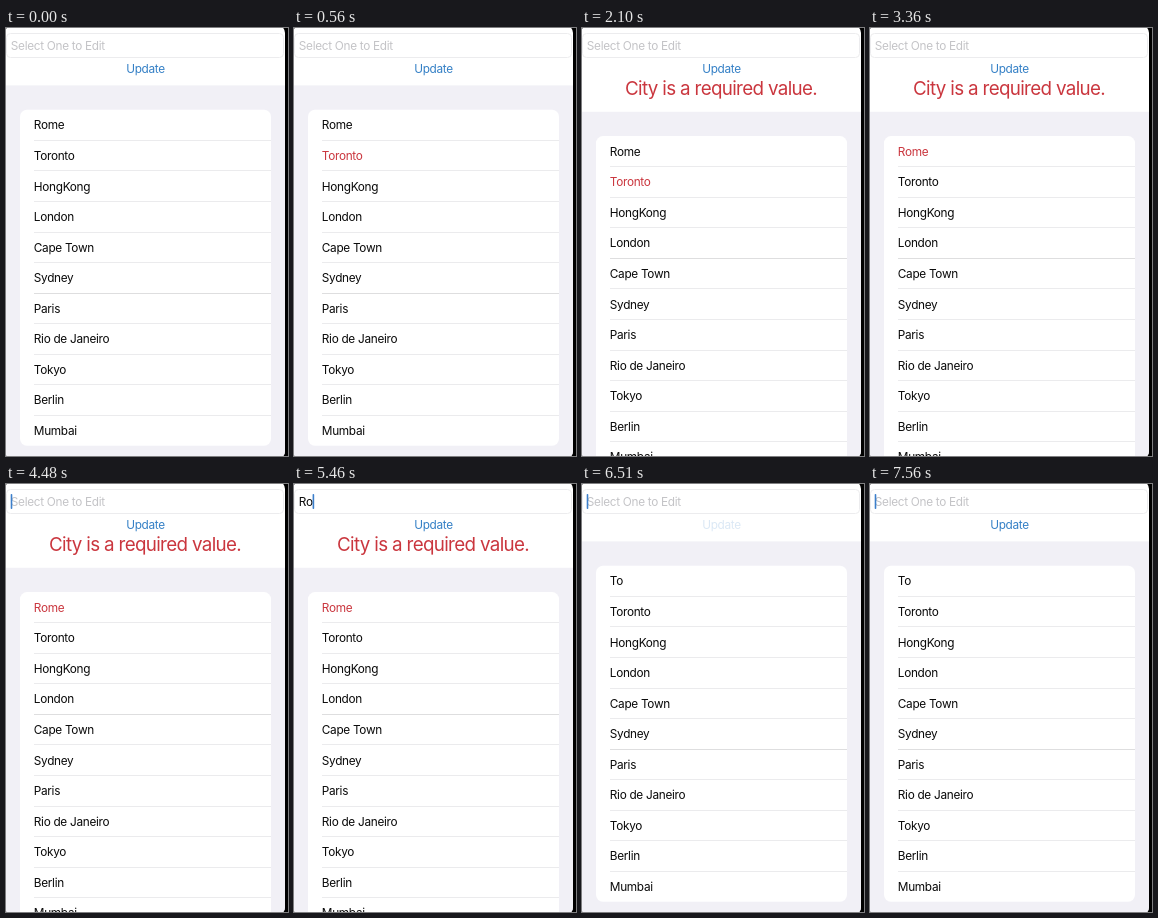
Write an HTML page with a canvas that moves like this. It is 282x428 px and loops after 7980 ms.

```html
<!DOCTYPE html>
<html lang="en">
<head>
<meta charset="utf-8">
<title>City list editor</title>
<style>
  html, body { margin: 0; width: 100%; height: 100%; overflow: hidden; background: #000; }
  canvas { display: block; width: 100vw; height: 100vh; }
</style>
</head>
<body>
<canvas id="stage"></canvas>
<script>
const W = 282, H = 428, LOOP = 7980, TICK = 70;
const ROW = 30.55, LIST_TOP = 81.7, ERROR_SHIFT = 26.4;
const BLUE = '#3580c6', RED = '#ca363e', BLACK = '#0a0a0a', HINT = '#c4c4c7';
const BODY = '11.8px Inter, "Liberation Sans", sans-serif';
const TITLE = '18.8px Inter, "Liberation Sans", sans-serif';
const CITIES = ['Rome', 'Toronto', 'HongKong', 'London', 'Cape Town', 'Sydney',
  'Paris', 'Rio de Janeiro', 'Tokyo', 'Berlin', 'Mumbai'];

const canvas = document.getElementById('stage');
const ctx = canvas.getContext('2d');

function resize() {
  const dpr = window.devicePixelRatio || 1;
  canvas.width = Math.round(innerWidth * dpr);
  canvas.height = Math.round(innerHeight * dpr);
}
addEventListener('resize', resize);
resize();

const clamp = v => Math.min(1, Math.max(0, v));
const within = (t, a, b) => t >= a && t < b;

function box(x, y, w, h, r, fill, stroke) {
  ctx.beginPath();
  ctx.roundRect(x, y, w, h, r);
  if (fill) { ctx.fillStyle = fill; ctx.fill(); }
  if (stroke) { ctx.strokeStyle = stroke; ctx.lineWidth = 1; ctx.stroke(); }
}

function setFont(font, spacing) {
  ctx.font = font;
  ctx.letterSpacing = spacing + 'px';
}

function label(text, x, y, color, align = 'left') {
  ctx.textAlign = align;
  ctx.fillStyle = color;
  ctx.fillText(text, x, y);
}

// Button dims on tap, then eases back to full strength.
function buttonAlpha(t) {
  const start = t >= 6510 ? 6510 : 1610;
  if (t < start) return 1;
  const p = clamp((t - start) / 490);
  return 0.18 + 0.82 * p * p * (3 - 2 * p);
}

function caretAlpha(t) {
  if (t < 4480) return 0;
  if (t < 6020) return 1;
  if (t < 6370) return clamp(0.4 - (t - 6020) / 175);
  if (t < 7070) return 1;
  if (t < 7490) return clamp(0.75 - (t - 7070) / 187);
  return t < 7560 ? 0.5 : 1;
}

function typed(t) {
  if (within(t, 5110, 5460)) return 'R';
  if (within(t, 5460, 6370)) return 'Ro';
  return within(t, 6370, 6510) ? 'To' : '';
}

function drawField(t) {
  const text = typed(t);
  setFont(BODY, -0.3);
  box(0.5, 5.5, 277, 24, 4, '#fff', '#ececee');
  const suggest = within(t, 5740, 6370);
  if (suggest) box(3, 9, 16, 17, 2, '#dce8f6');
  label(text || 'Select One to Edit', 4.8, 21.8, text ? BLACK : HINT);
  const end = text ? ctx.measureText(text).width : 0;
  ctx.globalAlpha = caretAlpha(t);
  box(4.7 + end, 10, 1.6, 15, 0.7, '#3c7fcb');
  ctx.globalAlpha = 1;
  if (suggest) drawSuggestion();
}

function drawSuggestion() {
  box(3.5, 28.5, 41, 21, 4, '#fff', '#dcdce0');
  label('To', 9, 43.2, BLUE);
  ctx.strokeStyle = '#a5a5aa';
  ctx.lineWidth = 1;
  ctx.beginPath();
  ctx.moveTo(32, 36); ctx.lineTo(38, 42);
  ctx.moveTo(38, 36); ctx.lineTo(32, 42);
  ctx.stroke();
}

function drawList(t, shift) {
  const top = LIST_TOP + shift;
  const selected = within(t, 560, 3360) ? 1 : within(t, 3360, 6510) ? 0 : -1;
  const strong = shift ? 4 : 6;
  box(14, top, 251, ROW * CITIES.length, 7, '#fff');
  setFont(BODY, -0.3);
  CITIES.forEach((city, i) => {
    const y = top + i * ROW;
    if (i) {
      ctx.fillStyle = i === strong ? '#dededf' : '#ebebed';
      ctx.fillRect(28, Math.floor(y + 0.1), 237, 1);
    }
    const name = i === 0 && t >= 6510 ? 'To' : city;
    label(name, 27.8, y + 19.7, i === selected ? RED : BLACK);
  });
}

function draw(t) {
  const error = within(t, 1610, 6510);
  const shift = error ? ERROR_SHIFT : 0;
  ctx.setTransform(canvas.width / W, 0, 0, canvas.height / H, 0, 0);
  ctx.fillStyle = '#000';
  ctx.fillRect(0, 0, W, H);

  ctx.save();
  ctx.beginPath();
  ctx.roundRect(-1, -3, 280, 434, 8);
  ctx.clip();
  ctx.fillStyle = '#fff';
  ctx.fillRect(0, 0, W, H);
  ctx.fillStyle = '#f1f0f6';
  ctx.fillRect(0, 57.4 + shift, W, H);
  drawList(t, shift);

  setFont(BODY, -0.3);
  ctx.globalAlpha = buttonAlpha(t);
  label('Update', 139.5, 45.2, BLUE, 'center');
  ctx.globalAlpha = 1;
  if (error) {
    setFont(TITLE, -0.66);
    label('City is a required value.', 139, 66.8, RED, 'center');
  }
  drawField(t);
  ctx.restore();
}

const begin = performance.now();
function frame() {
  const t = (performance.now() - begin) % LOOP;
  draw(Math.floor(t / TICK) * TICK);
  requestAnimationFrame(frame);
}
frame();
</script>
</body>
</html>
```
